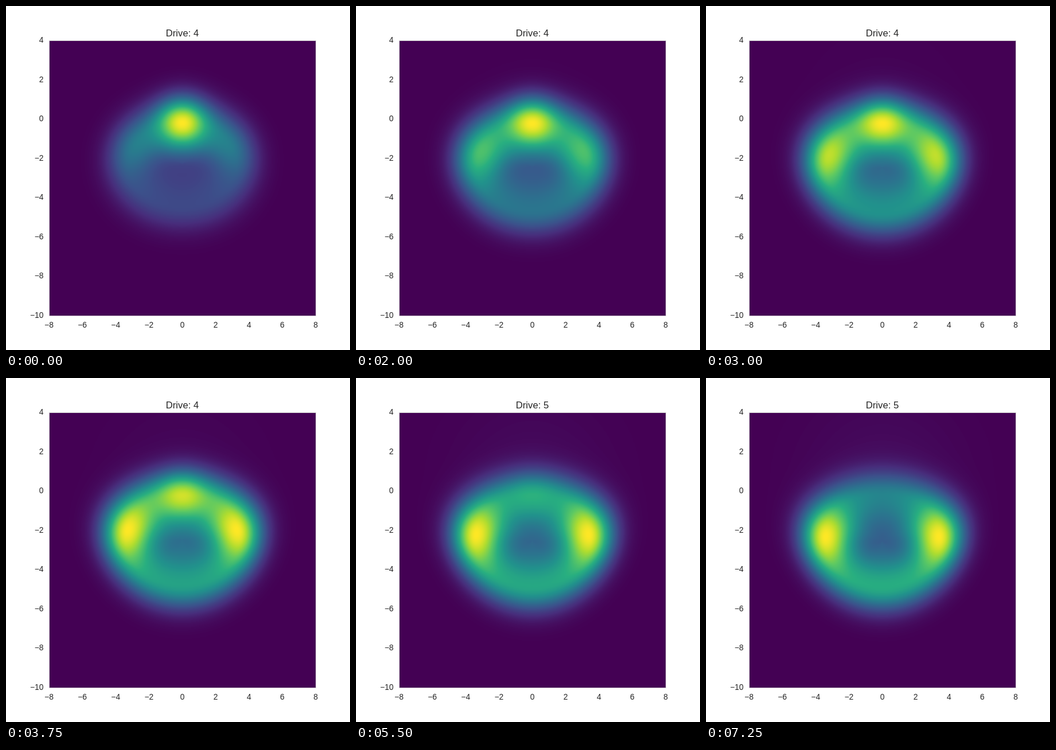
Recreate the animation shown at these times as an HTML page with a canvas. Size 600 px wide and 600 px high, loop 7.5 s.

```html
<!DOCTYPE html>
<html lang="en">
<head>
<meta charset="utf-8">
<title>Drive</title>
<style>
  html, body { margin: 0; width: 100%; height: 100%; overflow: hidden; background: #fff; }
  canvas, svg { position: absolute; display: block; }
  canvas { left: 76px; top: 61px; }
  svg { left: 0; top: 0; }
  text { font: 13.89px Arial, "Liberation Sans", sans-serif; fill: #262626; }
  #title { font-size: 16.67px; }
</style>
</head>
<body>
<canvas id="map" width="464" height="479"></canvas>
<svg id="axes" width="600" height="600">
  <rect x="75.5" y="60.5" width="465" height="480" fill="none" stroke="#ccc"/>
  <text id="title" x="307.5" y="53" text-anchor="middle">Drive: 4</text>
</svg>
<script>
const STEP = 250, STEPS = 30;
const SX = 1, SY = 0.88; // blur of the density, in axis units
const RAD = Math.PI / 180;

const mix = (a, b, p) => a + (b - a) * p;
const bell = (d, s) => Math.exp(-d * d / (2 * s * s));

const viridis = ['440154', '472d7b', '3b528b', '2c728e', '21918c', '28ae80', '5ec962', 'addc30', 'fde725']
  .map(h => [0, 2, 4].map(i => parseInt(h.slice(i, i + 2), 16)));
const palette = Array.from({ length: 256 }, (_, i) => {
  const p = i / 255 * (viridis.length - 1), k = Math.min(Math.floor(p), viridis.length - 2);
  return viridis[k].map((c, j) => Math.round(mix(c, viridis[k + 1][j], p - k)));
});

// Density at time p (0 to 1): an elliptic ring with two side lobes,
// a fading peak at its top and a faint haze above. The lobes have height 1.
function densityAt(p) {
  const q = p * (2 - p);
  const rx = mix(3.1, 3.4, q), ry = mix(2.1, 2.3, q), cy = mix(-2.3, -2.55, q);
  const egg = 0.06 * q;
  const top = mix(0.8, 0.42, p), bottom = mix(0.52, 0.62, p), middle = mix(0.4, 0.28, p);
  const peak = Math.max(0, Math.exp(0.85 - 1.92 * p + 0.2 * p * p) - top);
  const haze = 0.03 * p * p * (3 - 2 * p);
  const lobeAt = mix(63, 82, q) * RAD;
  const base = cos => mix(bottom, top, (1 + cos) / 2);
  const lobe = 1 - base(Math.cos(lobeAt));

  return (x, y) => {
    const v = (y - cy) / ry, u = x / rx / (1 + egg * v);
    const r = Math.hypot(u, v) || 1e-6, cos = v / r;
    const height = base(cos) + lobe * bell(Math.acos(cos) - lobeAt, 27 * RAD);
    const width = mix(SX / rx, SY / ry, cos * cos);
    const ring = r > 1
      ? height * bell(r - 1, width)
      : mix(middle, height, bell(r - 1, width * 1.1));
    return ring
      + peak * bell(x, SX) * bell(y - cy - ry, SY)
      + haze * bell(x, 3.3) * bell(y - 1, 2.6);
  };
}

const canvas = document.getElementById('map');
const axes = document.getElementById('axes');
const title = document.getElementById('title');
const ctx = canvas.getContext('2d');
const W = canvas.width, H = canvas.height;
const image = ctx.createImageData(W, H);
const field = new Float32Array(W * H);

function draw(step) {
  const density = densityAt(step / (STEPS - 1));
  let max = 0;
  for (let j = 0, n = 0; j < H; j++) {
    const y = 4 - (j + 1.5) * 14 / 480;
    for (let i = 0; i < W; i++, n++) {
      field[n] = density((i + 1.5) * 16 / 465 - 8, y);
      if (field[n] > max) max = field[n];
    }
  }
  field.forEach((value, n) => {
    const [r, g, b] = palette[Math.min(255, Math.floor(value / max * 256))];
    image.data[n * 4] = r;
    image.data[n * 4 + 1] = g;
    image.data[n * 4 + 2] = b;
    image.data[n * 4 + 3] = 255;
  });
  ctx.putImageData(image, 0, 0);
  title.textContent = 'Drive: ' + (step > STEPS / 2 ? 5 : 4);
}

function label(value, x, y, anchor) {
  const t = document.createElementNS(axes.namespaceURI, 'text');
  t.setAttribute('x', x);
  t.setAttribute('y', y);
  t.setAttribute('text-anchor', anchor);
  t.textContent = String(value).replace('-', '\u2212');
  axes.appendChild(t);
}
for (let v = -8; v <= 8; v += 2) label(v, 307.5 + v * 465 / 16, 561, 'middle');
for (let v = -10; v <= 4; v += 2) label(v, 65.5, 64 + (4 - v) * 480 / 14, 'end');

let shown = -1;
function tick() {
  const step = Math.floor(performance.now() / STEP) % STEPS;
  if (step !== shown) draw(shown = step);
  requestAnimationFrame(tick);
}
tick();
</script>
</body>
</html>
```
